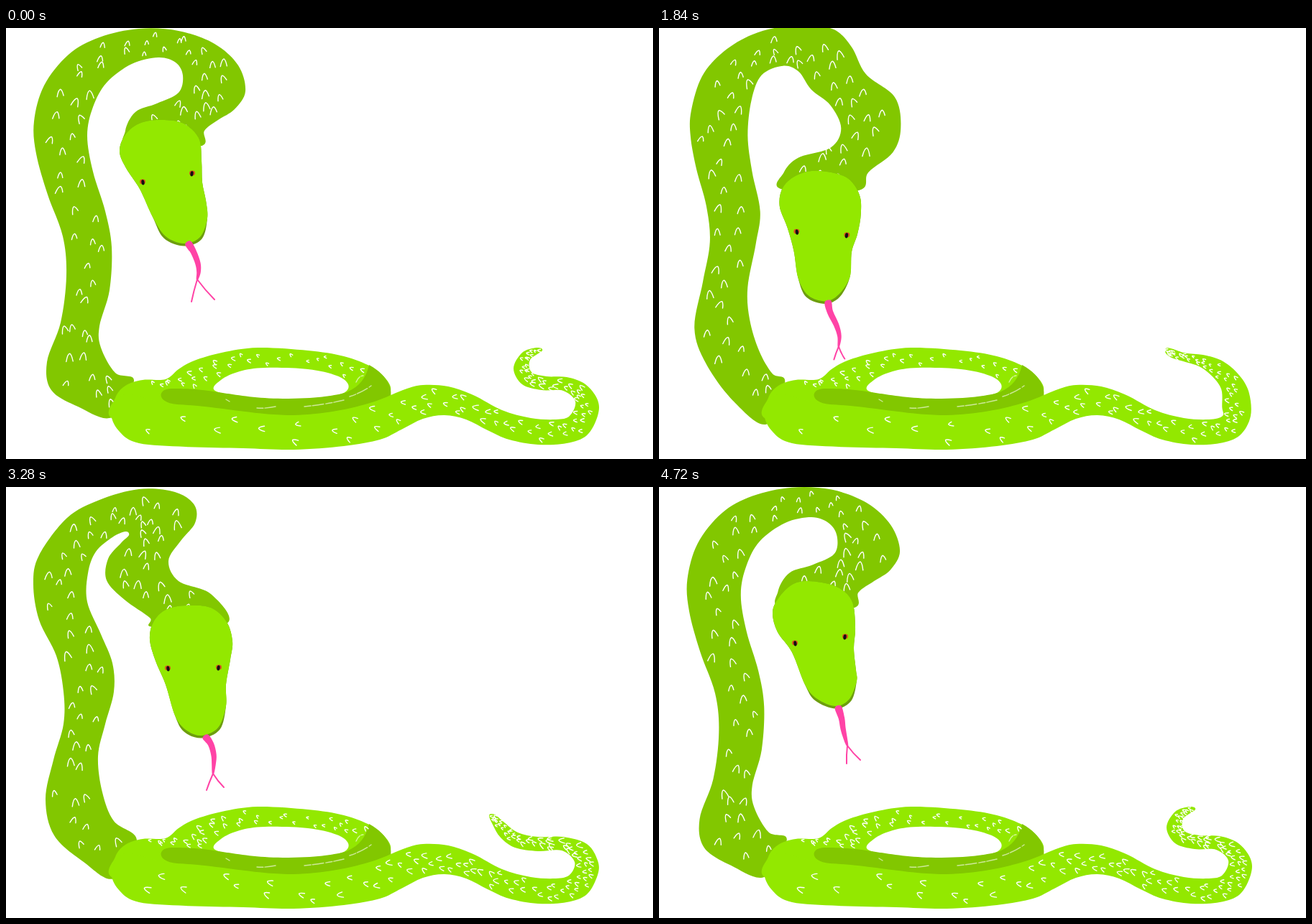
These frames come from a looping animation (900 by 600 pixels, 4.8 s). An HTML page:

```html
<!DOCTYPE html>
<html lang="en">
<head>
<meta charset="utf-8">
<title>Swaying snake</title>
<style>
html, body { margin: 0; width: 100%; height: 100%; overflow: hidden; background: #fff; }
svg { display: block; width: 900px; height: 600px; }
.dark { fill: #82c700; }
.light { fill: #93e800; }
.scale { fill: none; stroke: #fff; stroke-width: 1.4; stroke-linecap: round; stroke-linejoin: round; }
.fork { fill: none; stroke: #ff43a6; stroke-width: 2; stroke-linecap: round; }
</style>
</head>
<body>
<svg viewBox="0 0 900 600">
  <path id="neck" class="dark"/>
  <path id="neckScales" class="scale"/>
  <path id="loop" class="light"/>
  <path id="strip" class="light"/>
  <path id="hole" fill="#fff"/>
  <path id="coil" class="dark"/>
  <path class="scale" opacity=".6" stroke-width="1" stroke-dasharray="9 2 16 3"
    d="M349 529Q360 530 375 527M415 527Q445 524 470 518M478 513Q496 507 508 498M306 517l5 3M487 493q4-9 10-9"/>
  <path id="bodyScales" class="scale"/>
  <path id="chin" fill="#6d9e0e"/>
  <path id="head" class="light"/>
  <g id="eyeL"><ellipse rx="4" ry="3.4" fill="#d9531e"/><ellipse cx=".3" cy="1" rx="2.1" ry="3.7" fill="#111" transform="rotate(-10)"/></g>
  <g id="eyeR"><ellipse rx="4" ry="3.4" fill="#d9531e"/><ellipse cx="-.3" cy="1" rx="2.1" ry="3.7" fill="#111" transform="rotate(10)"/></g>
  <path id="tongue" fill="#ff43a6"/>
  <path id="fork" class="fork"/>
</svg>
<script>
const FRAMES = 40;
const el = id => document.getElementById(id);
const put = (id, d) => el(id).setAttribute('d', d);
const pairs = a => a.reduce((out, v, i) => (i % 2 ? out[out.length - 1].push(v) : out.push([v]), out), []);
const fix = v => v.toFixed(1);
const mix = (a, b, t) => [a[0] + (b[0] - a[0]) * t, a[1] + (b[1] - a[1]) * t];

// Neck: 22 points up the outer edge, 20 back down the inner one.
const neckUp = [
  147,542, 100,527, 63,504, 57,465, 76,410, 84,345, 79,290, 58,232, 42,175, 39,130, 53,80, 87,37, 130,13, 185,1,
  240,4, 290,22, 323,52, 333,88, 318,113, 295,128, 276,143, 269,165,
  172,165, 166,143, 180,117, 210,105, 240,90, 246,66, 236,48, 212,41, 175,50, 140,76, 121,110, 113,150,
  121,200, 138,255, 147,305, 144,365, 130,415, 132,445, 152,480, 178,491];
const neckRight = [
  148,540, 105,521, 70,495, 58,455, 67,400, 80,340, 79,285, 67,240, 44,185, 38,135, 47,90, 85,43, 130,16, 185,2,
  240,7, 270,22, 284,48, 276,72, 256,97, 252,120, 264,144, 289,168,
  196,185, 190,172, 170,150, 158,122, 170,92, 196,70, 197,54, 183,47, 160,57, 134,80, 117,112, 111,150,
  120,190, 138,235, 147,285, 141,335, 131,385, 133,430, 148,468, 178,492];
const neckFold = [
  150,545, 108,522, 67,485, 55,435, 66,380, 80,330, 80,285, 70,235, 46,185, 38,135, 46,95, 85,43, 130,18, 185,3,
  235,7, 262,25, 263,50, 243,75, 226,103, 240,131, 285,149, 307,190,
  206,195, 200,182, 165,157, 140,130, 142,100, 160,78, 171,67, 166,62, 148,70, 125,90, 114,120, 113,160,
  132,205, 148,245, 150,285, 138,330, 128,375, 134,425, 150,465, 182,492];
const neckLow = [
  150,550, 113,526, 75,482, 53,425, 62,365, 73,310, 68,255, 55,205, 44,165, 41,130, 52,80, 85,42, 125,16, 180,-2,
  232,1, 262,22, 262,62, 277,98, 310,119, 319,152, 307,183, 284,210,
  185,210, 187,200, 205,175, 226,150, 215,122, 188,105, 177,85, 179,62, 170,54, 143,68, 126,105, 121,150,
  127,200, 142,250, 140,290, 126,345, 128,395, 140,445, 158,480, 175,493];
const neckLeft = [
  150,552, 105,520, 66,465, 49,415, 60,350, 70,295, 65,245, 52,195, 44,150, 45,115, 60,67, 90,33, 130,9, 180,-3,
  238,0, 265,25, 284,65, 325,97, 336,140, 327,175, 293,204, 277,230,
  172,228, 175,205, 195,185, 240,170, 252,142, 235,110, 208,88, 192,62, 172,53, 143,65, 129,100, 124,150,
  130,200, 141,255, 134,300, 122,360, 126,405, 140,450, 158,481, 175,493];

// Face: 16 outline points, 2 eyes, 5 along the tongue, 2 fork tips.
const faceUp = [
  210,128, 245,132, 268,153, 272,185, 273,215, 278,240, 280,265, 270,291, 248,300, 222,290, 204,263, 186,224, 167,195, 158,172, 165,150, 183,134,
  190,214, 259,202, 253,299, 261,312, 267,328, 268,340, 266,350, 258,381, 290,378];
const faceRight = [
  248,152, 282,160, 300,182, 302,208, 300,245, 300,275, 299,305, 290,323, 270,331, 247,322, 233,310, 219,268, 200,235, 189,205, 194,180, 215,158,
  217,240, 288,236, 276,330, 279,345, 286,357, 291,368, 290,382, 286,407, 309,404];
const faceFold = [
  250,165, 285,168, 307,188, 315,215, 312,240, 306,275, 306,305, 295,335, 272,346, 250,338, 235,318, 222,275, 208,242, 200,212, 205,188, 222,171,
  225,252, 296,251, 277,347, 285,358, 289,373, 289,386, 288,399, 279,422, 303,418];
const faceLow = [
  235,184, 270,192, 292,220, 293,240, 286,270, 276,300, 270,335, 255,360, 237,366, 212,357, 197,328, 193,290, 183,262, 179,235, 185,208, 205,190,
  200,266, 270,276, 236,366, 239,382, 246,396, 242,414, 249,440, 241,460, 262,456];
const faceLeft = [
  225,203, 262,212, 280,236, 282,262, 277,290, 268,315, 265,352, 248,377, 230,385, 207,377, 193,352, 188,315, 180,283, 169,252, 174,225, 195,208,
  192,287, 262,293, 234,385, 237,400, 246,418, 250,434, 249,449, 242,467, 257,466];
const faceRise = [
  208,131, 245,138, 268,158, 273,195, 271,225, 274,255, 275,270, 265,295, 246,305, 220,295, 203,275, 185,230, 165,202, 158,175, 166,155, 185,136,
  189,217, 259,208, 249,306, 254,322, 256,336, 259,349, 262,360, 261,385, 280,380];

// Tail: 7 points out to the tip, 7 back.
const tailUp = [823,518, 806,496, 780,486, 752,485, 731,479, 729,462, 746,449, 738,445, 718,452, 706,474, 718,496, 745,504, 775,505, 792,520];
const tailRight = [823,520, 806,498, 775,487, 745,485, 720,478, 711,462, 723,443, 716,440, 700,452, 692,476, 706,496, 735,506, 773,506, 791,522];
const tailFold = [823,520, 808,497, 775,487, 740,487, 712,481, 692,466, 680,456, 672,457, 677,470, 688,488, 708,502, 740,507, 773,506, 791,522];
const tailLow = [822,512, 806,484, 782,464, 755,457, 725,460, 704,478, 701,493, 707,495, 712,485, 728,472, 748,471, 770,481, 786,500, 790,522];
const tailLeft = [820,505, 805,480, 782,461, 757,453, 732,451, 712,447, 702,448, 703,456, 715,462, 735,465, 755,470, 772,484, 783,503, 783,528];

const necks = [[0, neckUp], [9, neckRight], [15, neckFold], [23, neckLow], [29, neckLeft]];
const faces = [[0, faceUp], [9, faceRight], [15, faceFold], [23, faceLow], [29, faceLeft], [39, faceRise]];
const tails = [[0, tailUp], [9, tailRight], [15, tailFold], [23, tailLow], [29, tailLeft], [39, tailUp]];

const belly = pairs([158,562, 185,578, 250,583, 330,585, 400,587, 470,582, 520,573, 550,559, 580,544, 610,539,
  640,545, 670,560, 700,573, 740,580, 780,578, 808,567, 823,540]);
const back = pairs([165,510, 220,522, 280,530, 340,536, 400,539, 470,533, 520,517, 555,503, 580,497, 615,499,
  650,511, 690,532, 730,543, 765,545, 784,540]);
const loopTop = pairs([190,490, 222,489, 240,475, 262,463, 300,452, 350,445, 420,449, 470,457, 507,471]);
const loopIn = pairs([215,501, 250,502, 284,505, 300,488, 325,478, 360,473, 420,475, 460,484, 476,497]);

// Cyclic cubic interpolation of a pose.
function pose(keys, frame) {
  const n = keys.length;
  const at = i => [keys[(i + n) % n][0] + FRAMES * Math.floor(i / n), keys[(i + n) % n][1]];
  let i = n - 1;
  while (keys[i][0] > frame) i--;
  const [t0, a] = at(i - 1), [t1, b] = at(i), [t2, c] = at(i + 1), [t3, d] = at(i + 2);
  const h = t2 - t1, s = (frame - t1) / h, s2 = s * s, s3 = s2 * s;
  return pairs(b.map((v, j) => {
    const m1 = (c[j] - a[j]) / (t2 - t0) * h, m2 = (d[j] - v) / (t3 - t1) * h;
    return (2 * s3 - 3 * s2 + 1) * v + (s3 - 2 * s2 + s) * m1 + (3 * s2 - 2 * s3) * c[j] + (s3 - s2) * m2;
  }));
}

function blob(p) {
  const n = p.length, at = i => p[(i + n) % n];
  let d = 'M' + p[0].map(fix);
  for (let i = 0; i < n; i++) {
    const [a, b, c, e] = [at(i - 1), at(i), at(i + 1), at(i + 2)];
    d += 'C' + [b[0] + (c[0] - a[0]) / 6, b[1] + (c[1] - a[1]) / 6,
      c[0] - (e[0] - b[0]) / 6, c[1] - (e[1] - b[1]) / 6, c[0], c[1]].map(fix);
  }
  return d + 'Z';
}

function random(seed) {
  let s = seed * 7919 + 17 | 0;
  return () => {
    s = s + 0x6D2B79F5 | 0;
    let x = Math.imul(s ^ s >>> 15, 1 | s);
    x = x + Math.imul(x ^ x >>> 7, 61 | x) ^ x;
    return ((x ^ x >>> 14) >>> 0) / 4294967296;
  };
}

function along(line, u) {
  const f = u * (line.length - 1), i = Math.min(Math.floor(f), line.length - 2);
  return mix(line[i], line[i + 1], f - i);
}

function hook([x, y], size, turn, reach) {
  const c = Math.cos(turn) * size, s = Math.sin(turn) * size;
  const at = (px, py) => fix(x + px * c - py * s) + ' ' + fix(y + px * s + py * c);
  return `M${at(-.75, .9)}Q${at(-.5, -.8)} ${at(0, -.9)}Q${at(.4, -.7)} ${at(.75, reach)}`;
}

// Scatters scales between two edges.
function scales(a, b, count, seed, turn, power, big) {
  const rnd = random(seed);
  let d = '';
  for (let i = 0; i < count; i++) {
    const u = Math.pow((i + rnd() * .9) / count, power);
    const v = .16 + .68 * ((i * .618 + rnd() * .25) % 1);
    const p = along(a, u), q = along(b, u);
    const wide = Math.hypot(p[0] - q[0], p[1] - q[1]);
    const size = Math.max(2.2, Math.min(big, wide * .085)) * (.75 + rnd() * .4);
    d += hook(mix(p, q, v), size, turn + (rnd() - .5) * .9, .2 + rnd() * .6);
  }
  return d;
}

function tongue(p) {
  const half = [4.5, 4.2, 3.7, 2.8, 1.3], left = [], right = [];
  p.forEach((c, i) => {
    const a = p[Math.max(i - 1, 0)], b = p[Math.min(i + 1, p.length - 1)];
    const l = Math.hypot(b[0] - a[0], b[1] - a[1]) || 1;
    const x = (a[1] - b[1]) / l * half[i], y = (b[0] - a[0]) / l * half[i];
    left.push([c[0] + x, c[1] + y]);
    right.unshift([c[0] - x, c[1] - y]);
  });
  return blob(left.concat(right));
}

put('loop', blob(pairs([150,545, 152,515, 166,498]).concat(loopTop, pairs([528,488, 535,505, 520,525, 400,545, 250,560]))));
put('hole', blob(pairs([291,505, 299,490, 325,478, 360,473, 420,475, 460,484, 476,496, 470,508, 440,514, 400,517, 340,515])));
put('coil', 'M505 469C524 479 538 497 535 511C508 524 455 538 400 539C345 539 300 527 238 524C209 522 210 502 230 502C290 501 315 515 385 516C435 516 462 511 474 507C492 499 501 487 505 469Z');

function draw(frame) {
  const neck = pose(necks, frame), tail = pose(tails, frame), face = pose(faces, frame);
  const held = Math.floor(frame / 2), look = held % 3;

  put('neck', blob(neck));
  put('neckScales', scales(neck.slice(0, 22), neck.slice(22).reverse(), 68, held + 20, 0, .95, 6));

  const low = belly.concat(tail.slice(0, 7)), high = back.concat(tail.slice(7).reverse());
  put('strip', blob([[147, 537], ...low, ...high.slice().reverse()]));
  put('bodyScales', scales(low, high, [82, 104, 108][look], look + 3, -1.2, .65, 4.6)
    + scales(loopTop, loopIn, [30, 38, 42][look], look + 9, -1, 1, 3.4));

  const skull = face.slice(0, 16), jaw = skull.slice(6, 11);
  const drop = [[0, 0], [2.5, 2.5], [0, 3.5], [-2.5, 2.5], [0, 0]];
  put('head', blob(skull));
  put('chin', blob(skull.map((p, i) => i > 5 && i < 11 ? [p[0] + drop[i - 6][0], p[1] + drop[i - 6][1]] : p)));
  el('eyeL').setAttribute('transform', `translate(${face[16].map(fix)})`);
  el('eyeR').setAttribute('transform', `translate(${face[17].map(fix)})`);

  put('tongue', tongue(face.slice(18, 23)));
  const split = face[22], tips = face.slice(23);
  put('fork', tips.map(tip => {
    const m = mix(split, tip, .5);
    return `M${split.map(fix)}Q${fix(m[0] - 1)} ${fix(m[1] + 1)} ${tip.map(fix)}`;
  }).join(''));
}

let shown = -1;
function tick(now) {
  const step = Math.floor(now % 4800 / 40);
  // Frames last 80 and 40 ms in turn; the order slips in part of the loop.
  const frame = Math.floor((2 * step + (step % 42 < 16 ? 0 : 1)) / 3) % FRAMES;
  if (frame !== shown) draw(shown = frame);
  requestAnimationFrame(tick);
}
tick(0);
</script>
</body>
</html>
```
